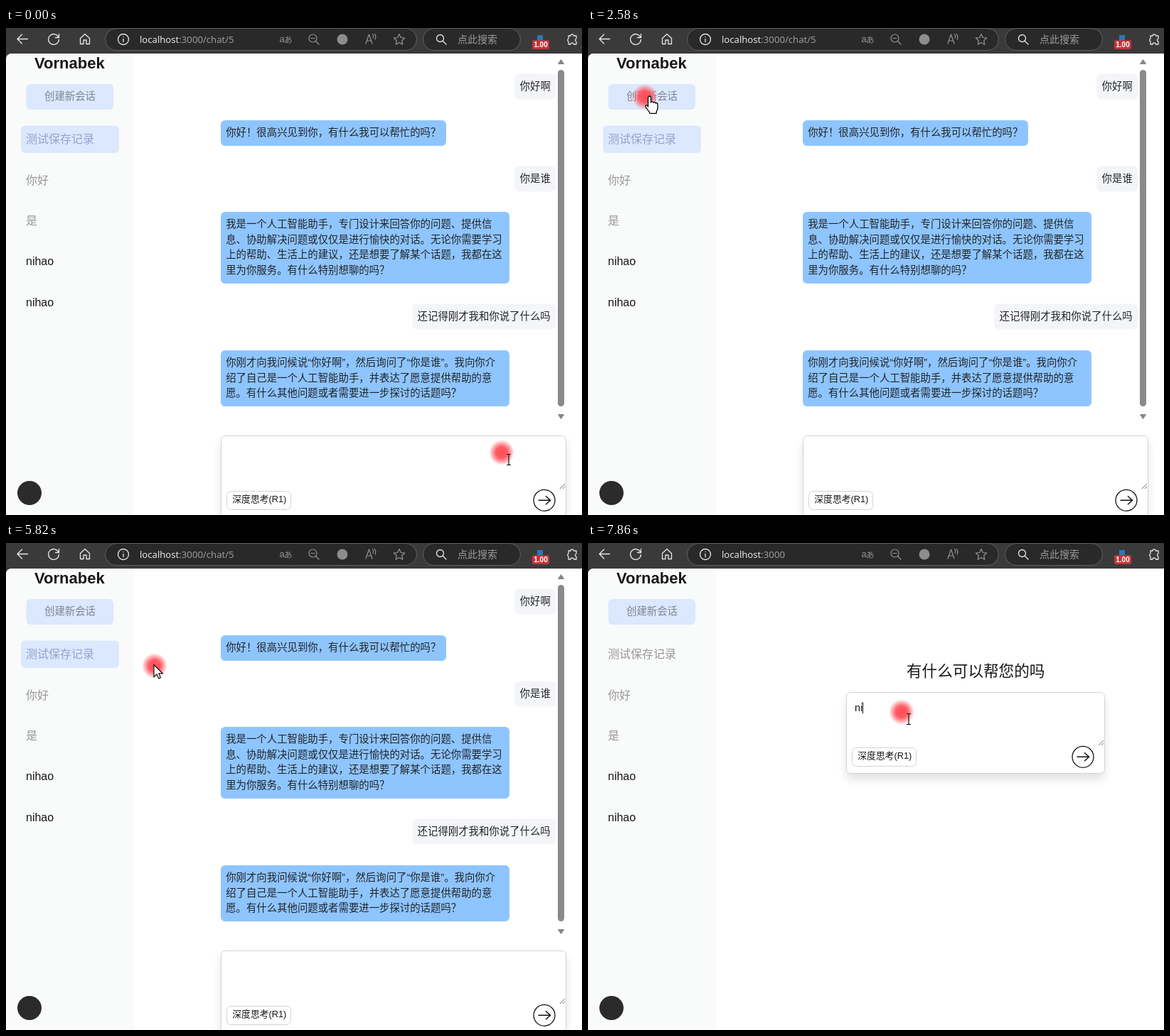
These frames come from a looping animation (810 by 686 pixels, 8 s). An HTML page:

```html
<!DOCTYPE html>
<html lang="zh-CN">
<head>
<meta charset="utf-8">
<title>Chat</title>
<style>
  html, body { margin: 0; width: 100%; height: 100%; overflow: hidden; background: #fff; }
  svg { display: block; width: 100%; height: 100%; }
  text { font-family: "Liberation Sans", "Noto Sans CJK SC", "Noto Sans CJK", sans-serif; white-space: pre; }
  .url { font-family: "Open Sans", "Noto Sans", sans-serif; }
</style>
</head>
<body>
<svg id="stage" viewBox="0 0 810 686">
  <defs>
    <radialGradient id="glow">
      <stop offset="0" stop-color="#ff4d55"/>
      <stop offset=".45" stop-color="#ff535b" stop-opacity=".95"/>
      <stop offset=".72" stop-color="#ff6068" stop-opacity=".55"/>
      <stop offset="1" stop-color="#ff7078" stop-opacity="0"/>
    </radialGradient>
    <filter id="shadow" x="-10%" y="-20%" width="120%" height="160%">
      <feDropShadow dx="0" dy="8" stdDeviation="6" flood-color="#000" flood-opacity=".11"/>
    </filter>
  </defs>

  <rect width="810" height="686" fill="#3a3a3a"/>
  <path d="M0 686V44a8 8 0 0 1 8-8H810V686z" fill="#fff"/>
  <path d="M0 686V44a8 8 0 0 1 8-8H180V686z" fill="#f9fafa"/>

  <g id="toolbar" fill="none" stroke="#e6e6e6" stroke-width="1.3" stroke-linecap="round" stroke-linejoin="round">
    <g fill="#292929" stroke="#606060" stroke-width="1">
      <rect x="139.500" y=".5" width="438" height="31" rx="15.500"/>
      <rect x="586.500" y=".5" width="137" height="31" rx="15.500"/>
    </g>
    <path d="M30.500 15.500H16M22.500 9l-6.500 6.500 6.500 6.500"/>
    <path d="M74 13.500a7.400 7.400 0 1 0 .4 3M74.500 8.500v5h-5"/>
    <path d="M104.500 14.500l6.500-6 6.500 6V22.500h-4.500v-5.500h-4v5.500h-4.500z"/>
    <circle cx="165" cy="16" r="7.500"/>
    <path d="M165 15.500v4M165 12.400v.1"/>
    <g stroke="#959595" stroke-width="1.200">
      <circle cx="431.500" cy="14.500" r="5.500"/>
      <path d="M435.500 18.500l4.500 4.500M429 14.500h5"/>
      <path d="M506 22l4.500-13 4.500 13M507.700 18h5.600M515.500 8.500q2 2.500 .5 5.500M518.500 8.500q2.500 4 .5 7.500"/>
      <path d="M553 8.500l2.300 5 5.400.6-4 3.700 1.100 5.400-4.800-2.700-4.800 2.700 1.100-5.400-4-3.700 5.400-.6z"/>
      <circle cx="473" cy="16" r="7.500" fill="#8d8d8d" stroke="none"/>
    </g>
    <circle cx="610.500" cy="14.500" r="5"/>
    <path d="M614.200 18.200l4.800 4.800"/>
    <rect x="747" y="10" width="8" height="8" fill="#2a78b8" stroke="none"/>
    <rect x="740" y="17" width="24" height="13" rx="2" fill="#bb383b" stroke="none"/>
    <path d="M791 11h3a2.200 2.200 0 0 1 4.400 0h3.600v4a2.200 2.200 0 0 0 0 4.200v3.800h-3.600a2.200 2.200 0 0 0-4.400 0h-3v-4a2.200 2.200 0 0 1 0-4z"/>
  </g>

  <g id="side"></g>
  <g id="chat"></g>
  <g id="home"></g>
  <circle cx="33" cy="655" r="17" fill="#2b2b2b"/>

  <g id="mouse">
    <circle r="18" fill="url(#glow)"/>
    <path id="arrow" transform="translate(-1 -1.500)" d="M0 0V17l4-3.700 2.700 6 2.700-1.200-2.600-5.800h5.500z"
      fill="#fff" stroke="#000" stroke-width="1.100"/>
    <path id="hand" transform="translate(6.500 -1)" d="M-2 2a2 2 0 0 1 4 0v7c0-2 3.400-2 3.400 .4 .4-1.600 3.200-1.400 3.200 .8 .5-1.200 2.900-.8 2.900 1.200v5c0 3-2 4-2 8h-9c-.5-3-4.500-6-6-9.500-.8-2 1.500-3 2.800-1.300L-2 15z"
      fill="#fff" stroke="#000" stroke-width="1.300" stroke-linejoin="round"/>
    <path id="beam" transform="translate(10 10)" d="M-3-7.500h2.200L0-6.800.8-7.500H3M0-6.800V6.800M-3 7.500h2.200L0 6.800.8 7.500H3"
      fill="none" stroke="#111" stroke-width="1.200"/>
  </g>
</svg>
<script>
const $ = id => document.getElementById(id);
const INK = '#171717', BODY = '#222428', LOOP = 8000, PAGE_AT = 6000;

function add(parent, tag, attrs, text) {
  const el = document.createElementNS('http://www.w3.org/2000/svg', tag);
  for (const k in attrs) el.setAttribute(k, attrs[k]);
  if (text) el.textContent = text;
  parent.appendChild(el);
  return el;
}
const box = (g, x, y, width, height, fill, rx = 6, more = {}) =>
  add(g, 'rect', { x, y, width, height, fill, rx, ...more });
const label = (g, x, y, size, str, fill = INK, more = {}) =>
  add(g, 'text', { x, y, 'font-size': size, fill, ...more }, str);

// Toolbar text
const bar = add($('toolbar'), 'g', { stroke: 'none' });
label(bar, 188, 21, 13.2, 'localhost', '#f2f2f2', { class: 'url' });
const path = label(bar, 243.300, 21, 13.2, '', '#a4a4a4', { class: 'url' });
label(bar, 384.500, 20, 13, 'a', '#959595');
label(bar, 391, 20.500, 11.5, 'あ', '#959595');
label(bar, 635, 21.300, 14, '点此搜索', '#9c9c9c');
label(bar, 752, 27, 10, '1.00', '#fff', { 'text-anchor': 'middle', 'font-weight': 'bold' });

// Sidebar
const side = $('side');
label(side, 40, 57, 22, 'Vornabek', INK, { 'font-weight': 'bold' });
box(side, 28.500, 79, 122.500, 36, '#dbe8fe');
label(side, 54, 101, 14.4, '创建新会话', '#7d8594');
const active = box(side, 21, 137.500, 138, 38.500, '#dbe8fe');
const entries = ['测试保存记录', '你好', '是', 'nihao', 'nihao'].map((s, i) =>
  label(side, 28, 162.200 + i * 57.4, 16, s, i < 3 ? '#979797' : INK));

// Conversation
const chat = $('chat'), home = $('home');
function bubble(x, y, w, lines, fill) {
  box(chat, x, y, w, Math.round(14.4 + 21.6 * lines.length), fill);
  lines.forEach((s, i) => label(chat, x + 7.2, y + 22.200 + 21.6 * i, 14.4, s, BODY));
}
const ask = (y, s) => {
  const w = 14.4 * (s.length + 1);
  bubble(773 - w, y, w, [s], '#f4f5f8');
};
const reply = (y, w, ...lines) => bubble(302, y, w, lines, '#8ec5ff');

ask(64.500, '你好啊');
reply(130, 317, '你好！很高兴见到你，有什么我可以帮忙的吗？');
ask(194.500, '你是谁');
reply(259, 406,
  '我是一个人工智能助手，专门设计来回答你的问题、提供信',
  '息、协助解决问题或仅仅是进行愉快的对话。无论你需要学习',
  '上的帮助、生活上的建议，还是想要了解某个话题，我都在这',
  '里为你服务。有什么特别想聊的吗？');
ask(388.500, '还记得刚才我和你说了什么吗');
reply(454, 406,
  '你刚才向我问候说“你好啊”，然后询问了“你是谁”。我向你介',
  '绍了自己是一个人工智能助手，并表达了愿意提供帮助的意',
  '愿。有什么其他问题或者需要进一步探讨的话题吗？');
box(chat, 776, 59, 9, 474, '#8a8a8a', 4.5);
add(chat, 'path', {
  d: 'M776.500 50.500l4-6 4 6zM776.500 544.500h8l-4 6z',
  fill: '#858585', stroke: '#858585', 'stroke-linejoin': 'round'
});

function composer(g, x, y, w) {
  const line = { stroke: '#d0d3d8' };
  box(g, x + .5, y + .5, w - 1, 114, '#fff', 6, { ...line, filter: 'url(#shadow)' });
  box(g, x + 8.5, y + 78.5, 90, 26, '#fff', 6, line);
  label(g, x + 16.300, y + 94, 12.8, '深度思考(R1)');
  const r = x + w;
  add(g, 'path', { d: `M${r - 9} ${y + 75}l7-7M${r - 5} ${y + 75}l3-3`, stroke: '#777', fill: 'none' });
  add(g, 'circle', { cx: r - 31, cy: y + 91.300, r: 15, fill: '#fff', stroke: '#111', 'stroke-width': 1.3 });
  add(g, 'path', { d: `M${r - 39.500} ${y + 91.300}h17m-6.500-6l6.500 6-6.500 6`, fill: 'none', stroke: '#111', 'stroke-width': 1.5 });
}
composer(chat, 302, 574, 486);
composer(home, 363, 210, 364);
label(home, 448, 187.800, 21.6, '有什么可以帮您的吗');
const typed = label(home, 375, 237, 14.4, '');
const caret = box(home, 375, 224, 1, 16, '#111', 0);

// Pointer keys: time, x, y
const keys = [
  [0, 697, 598], [310, 697, 598], [740, 95, 110], [900, 81, 98], [1250, 81, 98], [1290, 80, 97],
  [5360, 80, 97], [5820, 209, 173], [6570, 275, 219], [6880, 441, 237], [7000, 441, 237],
  [7070, 441, 238], [LOOP, 441, 238]
];
function pointer(t) {
  const i = keys.findIndex(k => k[0] > t);
  const [t0, x0, y0] = keys[i - 1], [t1, x1, y1] = keys[i];
  const u = (t - t0) / (t1 - t0), e = u * u * (3 - 2 * u);
  return [x0 + (x1 - x0) * e, y0 + (y1 - y0) * e];
}

const show = (el, on) => el.setAttribute('visibility', on ? 'visible' : 'hidden');
const inside = (x, y, l, t, r, b) => x >= l && x <= r && y >= t && y <= b;

function draw(t) {
  const isHome = t >= PAGE_AT;
  show(chat, !isHome);
  show(home, isHome);
  show(active, !isHome);
  entries[0].setAttribute('fill', isHome ? '#979797' : '#98a0cc');
  path.textContent = isHome ? ':3000' : ':3000/chat/5';

  const n = t < 7620 ? 0 : t < 7860 ? 1 : 2;
  typed.textContent = 'ni'.slice(0, n);
  caret.setAttribute('x', [375, 383, 386][n]);
  show(caret, isHome && (n > 0 || (t >= 6880 && t < 7390)));

  const [x, y] = pointer(t);
  $('mouse').setAttribute('transform', `translate(${x.toFixed(1)} ${y.toFixed(1)})`);
  const hand = inside(x, y, 29, 79, 151, 115) || inside(x, y, 21, 138, 159, 405);
  const beam = isHome ? inside(x, y, 364, 211, 726, 286) : inside(x, y, 303, 575, 787, 650);
  show($('hand'), hand);
  show($('beam'), beam);
  show($('arrow'), !hand && !beam);
}

const start = performance.now();
function tick() {
  draw((performance.now() - start) % LOOP);
  requestAnimationFrame(tick);
}
tick();
</script>
</body>
</html>
```
